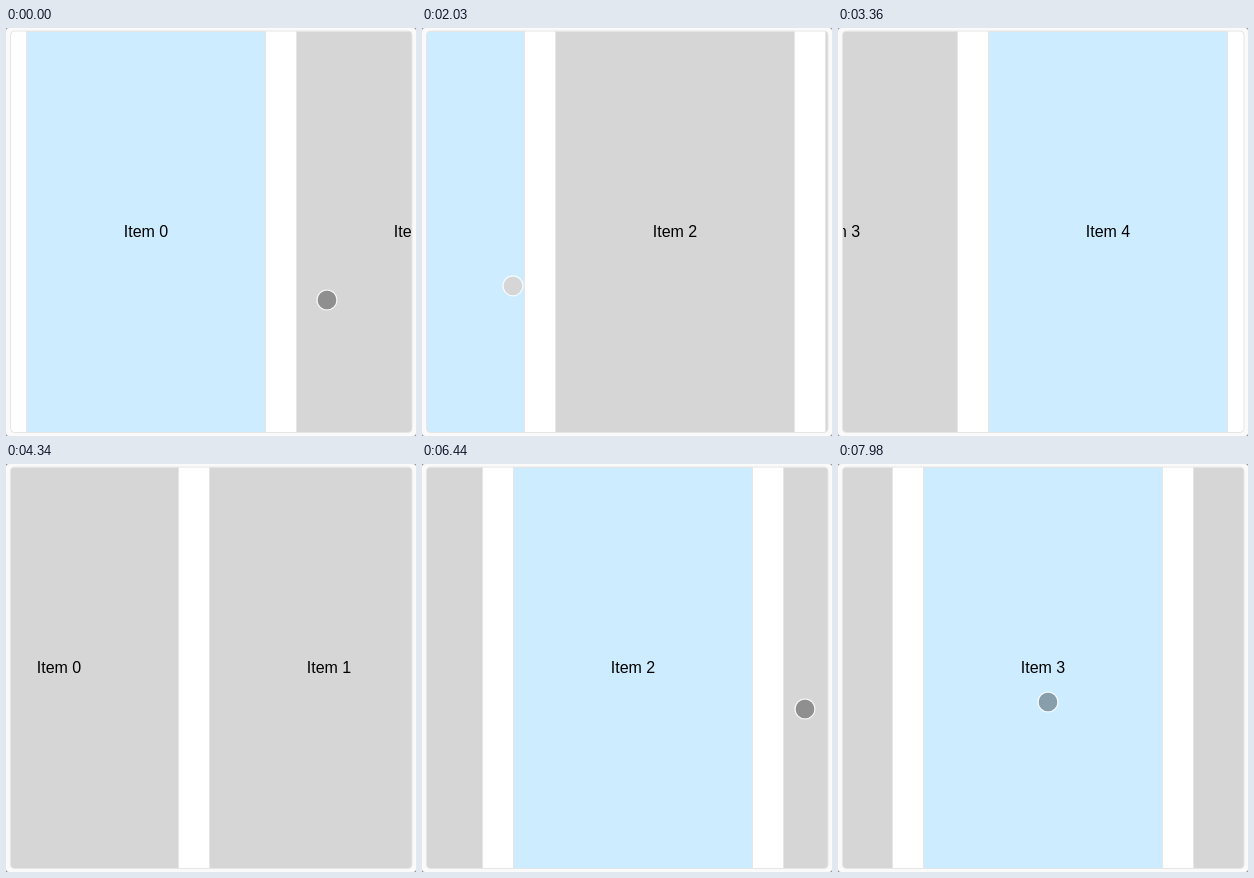
An HTML page with a canvas that plays this animation: 410 px wide and 408 px high, repeating every 8 s.

```html
<!DOCTYPE html>
<html lang="en">
<head>
<meta charset="utf-8">
<title>Carousel</title>
<style>
html, body { margin: 0; width: 100%; height: 100%; overflow: hidden; background: #fff; }
canvas { display: block; }
</style>
</head>
<body>
<canvas id="stage" width="410" height="408"></canvas>
<script>
const ctx = document.getElementById('stage').getContext('2d');
const LOOP = 8000, STEP = 70, WALK = 490;
const BLUE = '#cdecff', GREY = '#d6d6d6', LINE = '#e6e6e6';
const COUNT = 5, WIDTH = 240, PITCH = 270;
const DRAG_RATIO = 1.238; // pointer travel per pixel of scroll

// Each gesture grips at (x, y), lets go at release and settles on item at end.
// A click is a gesture released where it starts; pow sets the ease-out.
const gestures = [
  { start: 140, release: 420, end: 840, item: 1, pow: 2, x: 321, y: 272 },
  { start: 1680, release: 2660, end: 3360, item: 4, pow: 1.516, x: 366, y: 265 },
  { start: 3850, release: 4690, end: 5110, item: 0, pow: 4.85, x: 30, y: 245 },
  { start: 5180, release: 5180, end: 5670, item: 1, pow: 3, x: 383, y: 245 },
  { start: 6090, release: 6090, end: 6580, item: 2, pow: 3, x: 383, y: 245 },
  { start: 6720, release: 7210, end: 7960, item: 3, pow: 1.92, x: 383, y: 245 }
];
const rest = { start: 7770, x: 210, y: 238 };

const clamp = (v, lo, hi) => Math.min(hi, Math.max(lo, v));
const mix = (a, b, p) => a + (b - a) * p;
const smooth = p => p * p * (3 - 2 * p);
const progress = (t, a, b) => clamp((t - a) / (b - a || 1), 0, 1);

// Items are centred where the ends of the track allow it.
const goal = item => clamp(item * PITCH - 65, 0, 950);

gestures.forEach((g, i) => {
  g.prev = i ? gestures[i - 1].item : 0;
  g.next = gestures[i + 1] || rest;
});

function scrollAt(g, t) {
  const left = (1 - progress(t, g.start, g.end)) ** g.pow;
  return mix(goal(g.item), goal(g.prev), left);
}

function pointerAt(g, t) {
  const held = Math.min(t, g.release);
  const x = g.x - DRAG_RATIO * (scrollAt(g, held) - goal(g.prev));
  const y = mix(g.y, g.next.y, progress(held, g.start, g.release));
  const arrive = g.next.start - STEP;
  const walk = smooth(progress(t, arrive - WALK, arrive));
  return [mix(x, g.next.x, walk), mix(y, g.next.y, walk)];
}

function panel() {
  ctx.beginPath();
  ctx.roundRect(4.5, 3, 401.5, 401.5, 4);
}

function disc(x, y, r) {
  ctx.beginPath();
  ctx.arc(x, y, r, 0, Math.PI * 2);
}

function drawItem(i, x, on) {
  ctx.fillStyle = LINE;
  ctx.fillRect(x, 3, WIDTH, 402);
  ctx.fillStyle = on ? BLUE : GREY;
  ctx.fillRect(x + 1, 4, WIDTH - 2, 400);
  ctx.fillStyle = '#000';
  ctx.fillText('Item ' + i, x + WIDTH / 2, 209);
}

function drawPointer(x, y, pressed, ring) {
  ctx.fillStyle = pressed ? GREY : 'rgba(0,0,0,0.33)';
  disc(x, y, 9.5);
  ctx.fill();
  ctx.strokeStyle = 'rgba(255,255,255,0.8)';
  ctx.lineWidth = 1.2;
  disc(x, y, 10);
  ctx.stroke();
  if (!ring) return;
  ctx.strokeStyle = '#000';
  ctx.lineWidth = 1.3;
  disc(x, y, 21.5);
  ctx.stroke();
}

function draw(t) {
  const g = gestures.findLast(g => t >= g.start - STEP) || gestures[0];
  const scroll = scrollAt(g, t);
  const current = t > g.release ? g.item : g.prev;

  ctx.fillStyle = '#8a8a8a';
  ctx.fillRect(0, 0, 410, 408);
  ctx.fillStyle = '#fafafa';
  ctx.beginPath();
  ctx.roundRect(0, 0, 410, 408, 3);
  ctx.fill();

  ctx.save();
  panel();
  ctx.fillStyle = '#fff';
  ctx.fill();
  ctx.clip();
  ctx.font = '16px "Liberation Sans", Arial, sans-serif';
  ctx.textAlign = 'center';
  for (let i = 0; i < COUNT; i++) {
    drawItem(i, Math.round(20 + PITCH * i - scroll), i === current);
  }
  ctx.restore();

  ctx.strokeStyle = LINE;
  ctx.lineWidth = 1;
  panel();
  ctx.stroke();

  const pressed = t >= g.start - STEP && t < g.release + STEP;
  const ring = pressed && (t < g.start || t >= g.release);
  drawPointer(...pointerAt(g, t), pressed, ring);
}

function tick() {
  const t = performance.now() % LOOP;
  draw(Math.floor(t / STEP) * STEP);
  requestAnimationFrame(tick);
}
tick();
</script>
</body>
</html>
```
